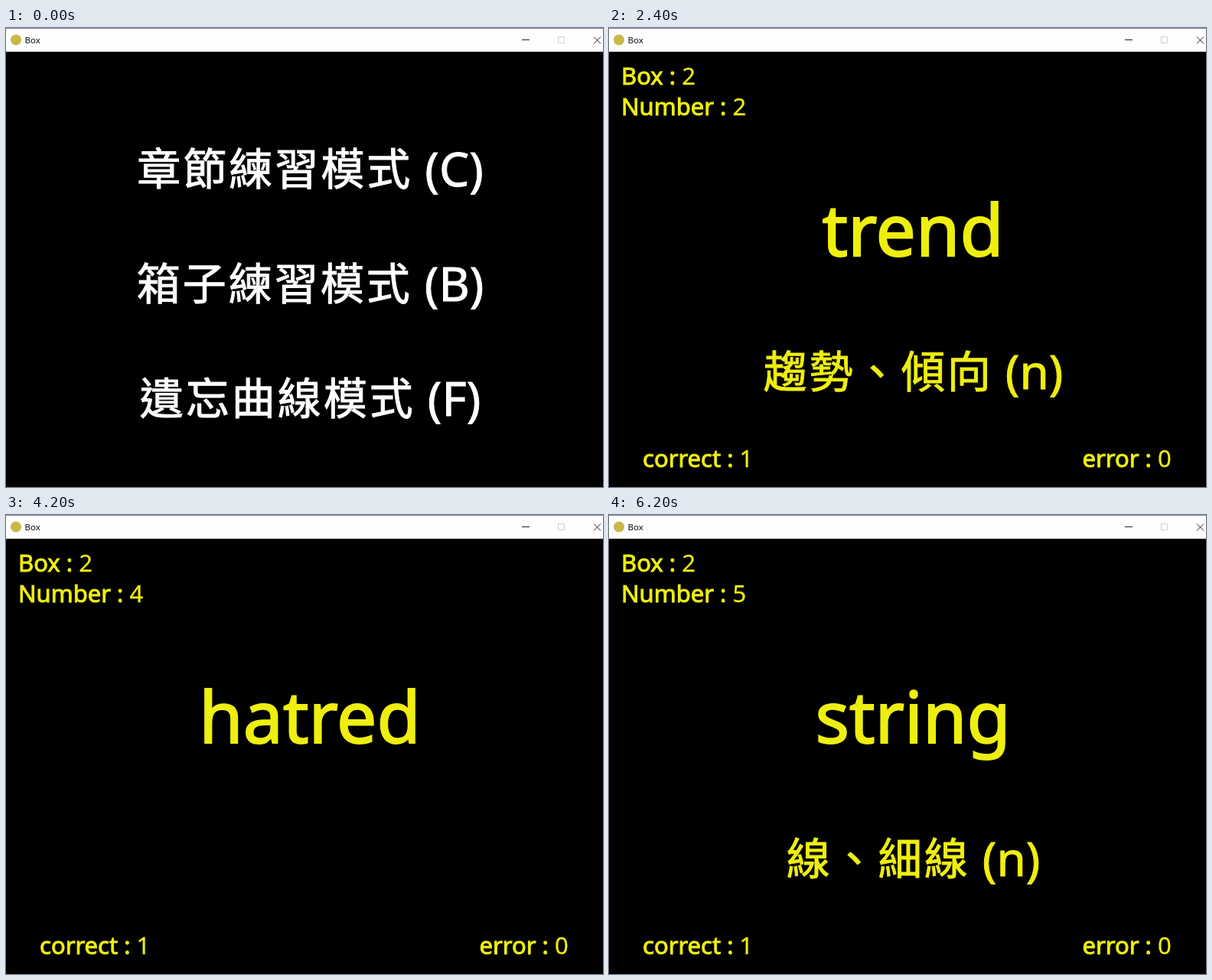
These frames come from a looping animation (780x600 px, 6.6 s). An HTML page:

```html
<!DOCTYPE html>
<html lang="zh-Hant">
<head>
<meta charset="utf-8">
<title>Box</title>
<style>
  html, body { margin: 0; width: 100%; height: 100%; overflow: hidden; background: #000; }
  svg { display: block; width: 780px; height: 600px; }
  text { font-family: "Noto Sans", "Open Sans", sans-serif; }
  .cjk { font-family: "Noto Sans CJK TC", "Noto Sans CJK", sans-serif; font-size: 57px; letter-spacing: 3px; }
  .line { font-size: 62px; text-anchor: middle; stroke-width: 1px; }
  .word { font-size: 93px; text-anchor: middle; stroke-width: 2px; }
  .label { font-size: 31px; stroke-width: 1px; }
  .label .num { stroke-width: .3px; }
  #menu { fill: #fff; stroke: #fff; }
  #card { fill: #eeee10; stroke: #eeee10; }
</style>
</head>
<body>
<svg viewBox="0 0 780 600">
  <rect width="780" height="600"/>
  <rect width="780" height="31" fill="#fefefe"/>
  <rect width="780" height="1" fill="#8082a4"/>
  <circle cx="13" cy="15.5" r="7" fill="#c8b84a"/>
  <text x="24.5" y="20" font-size="11.5" fill="#111">Box</text>
  <g fill="none" stroke="#222">
    <path d="M674 15.5h10"/>
    <path d="M721.5 11.5h8v8h-8z" stroke="#d0d0d0"/>
    <path d="M768 11.5l9 9M777 11.5l-9 9"/>
  </g>
  <g id="menu"></g>
  <g id="card"></g>
</svg>
<script>
const LOOP = 6600, STEP = 600;
const menuLines = ["章節練習模式 (C)", "箱子練習模式 (B)", "遺忘曲線模式 (F)"];
const cards = [
  { box: 5, word: "translate", meaning: "翻譯 (v)", correct: 4 },
  { box: 2, word: "trend", meaning: "趨勢、傾向 (n)", correct: 1 },
  { box: 2, word: "tragedy", meaning: "悲劇、慘劇 (n)", correct: 1 },
  { box: 2, word: "hatred", meaning: "仇恨 (n)", correct: 1 },
  { box: 2, word: "string", meaning: "線、細線 (n)", correct: 1 }
];

const menu = document.getElementById("menu");
const card = document.getElementById("card");

const span = (cls, s, dy = 0) => `<tspan class="${cls}" dy="${dy}">${s}</tspan>`;
const text = (cls, x, y, s) => `<text class="${cls}" x="${x}" y="${y}">${s}</text>`;
const label = (x, y, name, n) => text("label", x, y, `${name} : ${span("num", n)}`);

// Chinese part and the bracketed key differ in font and baseline
function line(y, s) {
  const cut = s.indexOf(" (");
  return text("line", 397.5, y, span("cjk", s.slice(0, cut), -2) + span("key", s.slice(cut), 2));
}

function drawCard(i, open) {
  const c = cards[i];
  return label(16, 74, "Box", c.box) +
    label(16, 114, "Number", i + 1) +
    text("word", 397, 298, c.word) +
    (open ? line(472, c.meaning) : "") +
    label(44, 574, "correct", c.correct) +
    label(618.5, 574, "error", 0);
}

menu.innerHTML = menuLines.map((s, i) => line(207 + 150 * i, s)).join("");

let shown = -1;
// Step 0 is the menu; then each card shows its word and, one step later, its meaning
function tick() {
  const step = Math.floor(performance.now() % LOOP / STEP);
  if (step !== shown) {
    shown = step;
    menu.style.display = step ? "none" : "";
    card.innerHTML = step ? drawCard((step - 1) >> 1, step % 2 === 0) : "";
  }
  requestAnimationFrame(tick);
}
tick();
</script>
</body>
</html>
```
